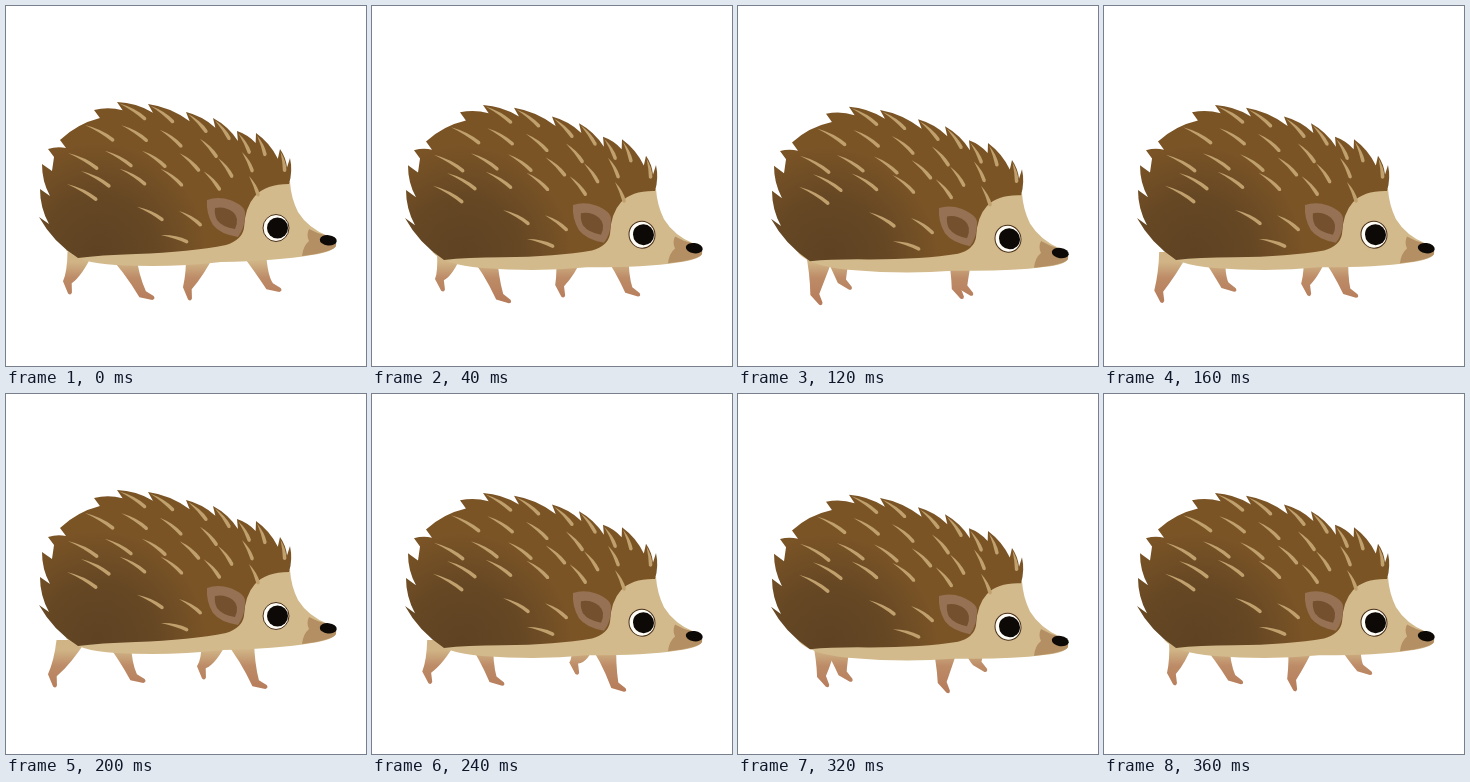
Animation of 360x360 px, one loop 0.4 s. Source, as an HTML page:

```html
<!DOCTYPE html>
<html lang="en">
<head>
<meta charset="utf-8">
<title>Walking hedgehog</title>
<style>
  html, body { margin: 0; width: 100%; height: 100%; overflow: hidden; background: #fff; }
  svg { display: block; width: 100vw; height: 100vh; }
</style>
</head>
<body>
<svg viewBox="0 0 360 360">
  <defs>
    <linearGradient id="skin" gradientUnits="userSpaceOnUse" x1="0" y1="256" x2="0" y2="296">
      <stop offset="0" stop-color="#d0b486"/>
      <stop offset=".4" stop-color="#bd8b67"/>
      <stop offset="1" stop-color="#b67c5b"/>
    </linearGradient>
    <radialGradient id="fur" gradientUnits="userSpaceOnUse" cx="92" cy="245" r="110">
      <stop offset="0" stop-color="#5e4222"/>
      <stop offset=".5" stop-color="#654724"/>
      <stop offset="1" stop-color="#7b5426"/>
    </radialGradient>
  </defs>
  <g id="legs" fill="url(#skin)"></g>
  <g id="body">
    <path fill="#d3ba8c" d="M60 244 Q72 257 110 259 Q165 262 215 256 Q270 255 306 249 Q327 246 330 240
      Q331 233 322 230 Q302 222 292 206 Q285 192 284 176 L240 175 L200 225Z"/>
    <path fill="#b48f64" d="M303 223 Q312 228 322 230 Q332 234 330 240 Q327 246 296 250 Q297 240 303 235 Q300 229 303 223Z"/>
    <path id="coat" fill="url(#fur)"/>
    <path id="streaks" fill="#c0a06c"/>
    <path fill="#967153" d="M201 194 Q212 190 224 194 Q240 200 239 208 Q239 222 232 231 Q214 228 207 219 Q200 208 201 194Z"/>
    <path fill="#74502f" d="M209 202 Q219 200 227 206 Q234 212 229 223 Q216 221 211 214 Q208 208 209 202Z"/>
    <ellipse cx="270" cy="222" rx="13" ry="13.5" fill="#fffdf5" stroke="#4a3019"/>
    <circle cx="271.5" cy="222" r="10.5" fill="#0d0907"/>
    <ellipse cx="322.3" cy="234.3" rx="8.5" ry="5.2" fill="#0d0907" transform="rotate(6 322 234)"/>
  </g>
</svg>
<script>
  const STEP = 40, STEPS = 10;
  const $ = id => document.getElementById(id);
  const rad = deg => deg * Math.PI / 180;
  const polar = ([x, y], deg, r) => [x + r * Math.cos(rad(deg)), y + r * Math.sin(rad(deg))];

  // Direction in which the spines lie, steeper toward the head
  const flow = ([x, y]) => 28 + 50 * ((x - 60) / 215) ** 2 - Math.max(0, y - 190) * .6;

  // Curve from a to b that swells to the outside by a share of its length
  const bulge = ([ax, ay], [bx, by], k) =>
    `Q${(ax + bx) / 2 + (by - ay) * k} ${(ay + by) / 2 - (bx - ax) * k} ${bx} ${by}`;

  const rumpTips = [[33, 211], [34, 183], [36, 158]];
  const crownTips = [[42, 143], [54, 134], [88, 104], [111, 96], [142, 98], [180, 106],
    [207, 112], [231, 125], [250, 127], [274, 143], [284, 152]];

  function coatShape() {
    let at = [72, 252];
    let d = `M${at}`;
    for (const tip of rumpTips) {
      d += bulge(at, tip, .13);
      at = [tip[0] + 10, tip[1] + 7];
      d += `L${at}`;
    }
    crownTips.forEach((tip, i) => {
      const next = crownTips[i + 1];
      const end = next ? polar(next, flow(next) + 25, 10) : [283, 178];
      if (i === 0) d += `L${polar(tip, 53, 10)}`;
      d += `L${tip}${bulge(tip, end, .13)}`;
    });
    return d + "Q260 178 249 190Q239 201 238 222Q236 234 220 239Q185 246 130 248Q94 249 72 252Z";
  }

  // Thin at the start, thick and round at the end
  function streak(p) {
    const a = flow(p), len = 33 - 14 * (p[0] - 60) / 215;
    const end = polar(p, a, len), mid = polar(p, a - 9, len * .55);
    const side = (q, k) => polar(q, a + 90, k);
    return `M${p}Q${side(mid, -1.8)} ${side(end, -1.8)}` +
      `Q${polar(end, a, 3)} ${side(end, 1.8)}Q${side(mid, 1.8)} ${p}Z`;
  }

  function row(n, a, c, b) {
    return Array.from({ length: n }, (_, i) => {
      const t = n > 1 ? i / (n - 1) : 0, u = 1 - t;
      return a.map((v, k) => u * u * v + 2 * u * t * c[k] + t * t * b[k]);
    });
  }

  $("coat").setAttribute("d", coatShape());
  $("streaks").setAttribute("d", [
    ...crownTips.slice(3, -1).map(tip => polar(tip, flow(tip), 3)),
    ...row(5, [79, 119], [150, 115], [236, 146]),
    ...row(5, [62, 147], [135, 140], [212, 152]),
    ...row(5, [75, 165], [150, 158], [243, 170]),
    ...row(3, [61, 178], [145, 210], [173, 205]),
    [155, 229]
  ].map(streak).join(""));

  function addLeg(leg) {
    const path = document.createElementNS("http://www.w3.org/2000/svg", "path");
    $("legs").append(path);
    return { path, ...leg };
  }

  // x, y: centre of the toe's loop; reach, lift: its radii; far legs come first
  const legs = [
    { x: 101, y: 287, reach: 37, lift: 5, phase: Math.PI, w: 13 },
    { x: 236, y: 284, reach: 38, lift: 8, phase: 0, w: 13 },
    { x: 98, y: 292, reach: 49, lift: 6, phase: 0, w: 15 },
    { x: 222, y: 293, reach: 38, lift: 5, phase: Math.PI, w: 15 }
  ].map(addLeg);

  function legShape({ x, y, reach, lift, phase, w }, turn) {
    const swing = Math.cos(turn + phase);
    const toe = [x + reach * swing, y + lift * Math.sin(turn + phase)];
    const hip = x - 8 + reach * swing * .5;
    const tilt = 48 - 28 * swing;
    const ankle = polar(toe, tilt + 180, 13);
    const side = (q, k) => polar(q, tilt + 90, k);
    const heel = side(ankle, 4), instep = side(ankle, -4);
    return `M${hip - w} 246Q${(hip - w + heel[0]) / 2 + 2} 266 ${heel}` +
      `L${side(toe, 2)}Q${polar(toe, tilt, 3)} ${side(toe, -2)}` +
      `L${polar(instep, tilt, 4)}Q${(hip + w + instep[0]) / 2} 270 ${hip + w} 246Z`;
  }

  function draw(now) {
    const turn = Math.floor(now / STEP) % STEPS / STEPS * 2 * Math.PI;
    // The body dips twice per stride, more toward the nose
    const dip = Math.abs(Math.sin(turn));
    $("body").setAttribute("transform", `matrix(1 ${.04 * dip} 0 1 0 ${.5 * dip})`);
    for (const leg of legs) leg.path.setAttribute("d", legShape(leg, turn));
  }

  let start;
  function tick(now) {
    start ??= now;
    draw(now - start);
    requestAnimationFrame(tick);
  }
  draw(0);
  requestAnimationFrame(tick);
</script>
</body>
</html>
```
